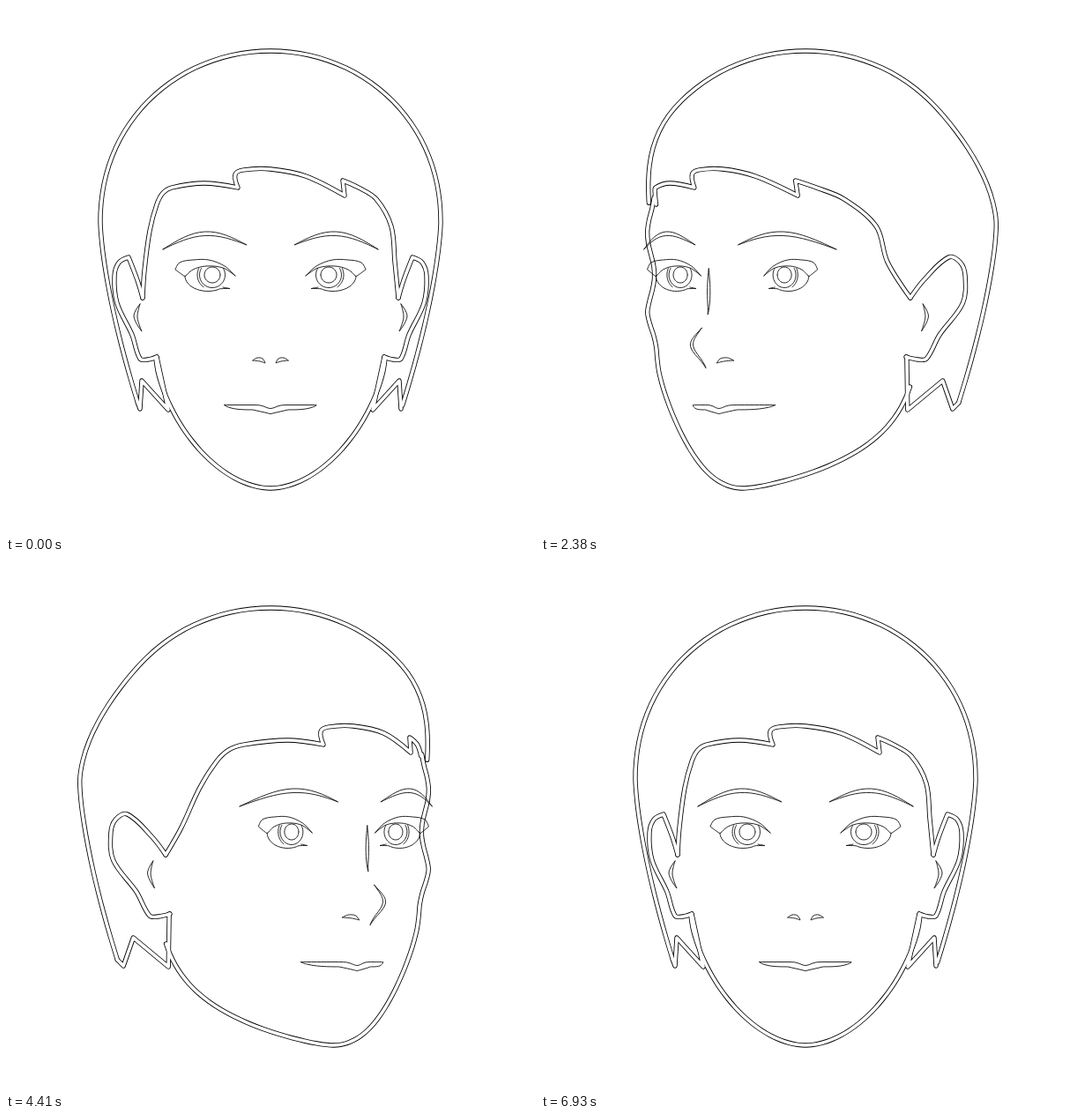
Recreate the animation shown at these times as an HTML page with a canvas. Size 600 px wide and 600 px high, loop 7 s.

```html
<!DOCTYPE html>
<html lang="en">
<head>
<meta charset="utf-8">
<title>Turning head</title>
<style>
  html, body { margin: 0; width: 100%; height: 100%; overflow: hidden; background: #fff; }
  canvas { display: block; width: 600px; height: 600px; }
</style>
</head>
<body>
<canvas id="stage" width="600" height="600"></canvas>
<script>
const ctx = document.getElementById('stage').getContext('2d');
const STEP = 70, COUNT = 100, SWING = 48, MAX_YAW = 37;
const { PI, sin, cos, sqrt, exp, abs, min, max, hypot } = Math;

// Head space: x from the middle, y down the stage, z towards the viewer
const parse = s => s.trim().split(/\s+/).map(p => p.split(',').map(Number));
const range = (n, f) => Array.from({ length: n + 1 }, (_, i) => f(i / n));
const mix = (a, b, t) => a + (b - a) * t;
const smooth = t => { t = min(1, max(0, t)); return t * t * (3 - 2 * t); };
const mirror = pts => pts.map(([x, ...rest]) => [-x, ...rest]);
const withDepth = (pts, depth) => pts.map(([x, y]) => [x, y, depth(x)]);

// Skull of hair: half width and depth of the centre at each height
const hairHalf = y => y < 245
  ? 193 * sqrt(max(0, 1 - ((245 - y) / 194) ** 2.1))
  : 193 - 44 * ((y - 245) / 210) ** 1.5;
const hairDepth = y => -46 * smooth((y - 110) / 150);

// Face outline: half width, depth on the near and the far side
const jawPart = y => min(1, max(0, (y - 400) / 147));
const jawHalf = y => 130 * (1 - jawPart(y) ** 1.5) ** 0.54;
const jawDepth = y => -20 + 180 * jawPart(y) ** 4;
function cheekDepth(y) {
  const rise = min(1, max(0, (400 - y) / 50));
  return 116 + 44 * jawPart(y) ** 3 + rise * (16 + 9 * cos(2 * PI * (y - 258) / 94));
}

const fringe = withDepth(parse(`-145,331 -143,300 -137,255 -129,225 -122,212 -112,206
  -75,201 -37,206 -40,191 -31,186 0,185 40,193 84,215 82,198 100,206 120,219 137,250 141,290 145,331`),
  x => 24 + 186 * sqrt(1 - abs(x / 145) ** 2.7));
const ear = parse(`-145,331,24 -151,311,2 -161,285,-41 -172,291,-49 -177,306,-51 -174,337,-51
  -157,373,-26 -148,400,-11 -139,401,-7 -129,398,3`);
const tail = parse('-148,457,-77 -146,425,-56 -116,458,-27 -129,398,1');
const concha = parse('-148,338,-2 -155,352,-2 -146,369,-2 -151,353,-2');

const browEdge = rise => range(8, t => [mix(-122, -27, t), mix(276, 271, t) - rise * sin(PI * t)]);
const brow = withDepth([...browEdge(17.5), ...browEdge(13).reverse().slice(1, -1)],
  x => 228 - 0.0042 * x * x);

const nostril = withDepth(parse('-20,402 -15,399 -9,400 -6,405 -12,403'), x => 243 - 1.05 * abs(x));

const lipTop = x => 452.5 + 4 * exp(-((x / 8) ** 2));
const lipBottom = x => 453 + 5 * (1 - (x / 52) ** 6) + 4.5 * max(0, 1 - abs(x) / 20);
const lipEdge = f => range(26, t => [mix(-52, 52, t), f(mix(-52, 52, t))]);
const mouth = withDepth([...lipEdge(lipTop), ...lipEdge(lipBottom).reverse()], x => 219 - 0.014 * x * x);

const onEye = pts => withDepth(pts, () => 185);
const arc = (x, y, rx, ry, from, to) =>
  range(16, t => [x + rx * cos(mix(from, to, t)), y + ry * sin(mix(from, to, t))]);
const lid = onEye(parse('-40,306 -52,295 -70,288 -88,288 -103,291 -108,299 -97,307 -88,299 -73,295 -54,297'));
const eyeLines = [
  [...arc(-71, 306, 26, 17.5, PI, 1), [-46, 320.5], [-54, 319]],
  arc(-66, 305, 9, 9, 0, 2 * PI),
  arc(-66, 305, 14.5, 14.5, -0.55, PI + 0.55),
  arc(-66, 305, 17, 17, 2.2, 3.6)
].map(onEye);

// A sliver of the nose profile that swells in the middle
function noseSliver(mid, reach) {
  const side = width => range(12, t => {
    const y = mid + reach * (2 * t - 1), g = exp(-(((y - 384) / 20) ** 2));
    return [14 + 14 * g + width * sin(PI * t), y, 217 + 15 * g];
  });
  return [...side(1.8), ...side(-1.8).reverse().slice(1, -1)];
}

// Smooth curve that keeps sharp turns as corners
function trace(pts, closed) {
  const n = pts.length;
  const at = i => pts[(i + n) % n];
  const unit = (p, q) => {
    const dx = q[0] - p[0], dy = q[1] - p[1], l = hypot(dx, dy) || 1;
    return [dx / l, dy / l];
  };
  const dir = pts.map((p, i) => {
    if (!closed && (i === 0 || i === n - 1)) return [0, 0];
    const a = unit(at(i - 1), p), b = unit(p, at(i + 1));
    return a[0] * b[0] + a[1] * b[1] < 0.3 ? [0, 0] : unit(at(i - 1), at(i + 1));
  });
  ctx.beginPath();
  ctx.moveTo(...pts[0]);
  for (let i = 0; i < (closed ? n : n - 1); i++) {
    const p = at(i), q = at(i + 1), d = dir[i], e = dir[(i + 1) % n];
    const h = hypot(q[0] - p[0], q[1] - p[1]) / 3;
    ctx.bezierCurveTo(p[0] + d[0] * h, p[1] + d[1] * h, q[0] - e[0] * h, q[1] - e[1] * h, q[0], q[1]);
  }
  if (closed) ctx.closePath();
}

function stroke(pts, color, width, closed) {
  if (pts.length < 2) return;
  trace(pts, closed);
  ctx.strokeStyle = color;
  ctx.lineWidth = width;
  ctx.stroke();
}

function yawAt(n) {
  const swing = i => {
    const s = sin(PI * i / SWING);
    return MAX_YAW * (0.55 * s + 0.45 * s * s);
  };
  if (n <= SWING) return -swing(n);
  return n <= 2 * SWING + 1 ? swing(n - SWING - 1) : 0;
}

// Everything is worked out as a turn to the right; dir flips it for the left
function draw(yaw) {
  const dir = yaw < 0 ? -1 : 1, turn = abs(yaw);
  const c = cos(turn * PI / 180), s = sin(turn * PI / 180);
  const across = ([x, , z]) => x * c + z * s;
  const place = (x, y) => [300 + dir * x, y];
  const project = pts => pts.map(p => place(across(p), p[1]));
  const faceEdge = y => jawHalf(y) * c + cheekDepth(y) * s;
  const inSight = (x, y) => x < 0 || y < 205 || x >= faceEdge(y) - 1;
  const visible = pts => pts.filter(p => p[2] > 120 || inSight(across(p), p[1]));
  const thin = (pts, closed = true) => stroke(project(pts), '#000', 0.85, closed);

  const hairEdge = (side, y) =>
    [side * hairHalf(y) * sqrt(c * c + 1.166 * s * s) + hairDepth(y) * s, y];
  const hair = [
    ...range(8, t => hairEdge(-1, mix(450, 245, t))),
    ...range(28, t => hairEdge(t < 0.5 ? -1 : 1, 245 - 194 * sin(PI * t))).slice(1),
    ...range(14, t => hairEdge(1, mix(245, 453, t))).slice(1)
  ].filter(p => inSight(...p));

  const jawTop = Math.asin(turn * 1.2 / 147);
  const cheekTop = 400 - 183 * min(1, turn / 22);
  const jaw = [
    ...range(16, t => {
      const y = 400 + 147 * sin(mix(jawTop, PI / 2, t));
      return [jawDepth(y) * s - jawHalf(y) * c, y];
    }),
    ...range(16, t => {
      const y = 400 + 147 * cos(t * PI / 2);
      return [faceEdge(y), y];
    }).slice(1),
    ...range(14, t => {
      const y = mix(400, cheekTop, t);
      return [faceEdge(y), y];
    }).slice(1)
  ];

  const bands = [hair, jaw].map(b => b.map(p => place(...p)));
  const locks = [ear, mirror(ear), tail, mirror(tail), dir < 0 ? mirror(fringe) : fringe];
  for (const lock of locks) bands.push(project(visible(lock)));
  bands[4].unshift(place(...hair[0]));

  ctx.fillStyle = '#fff';
  ctx.fillRect(0, 0, 600, 600);
  ctx.lineJoin = ctx.lineCap = 'round';
  for (const b of bands) stroke(b, '#000', 5.3);
  for (const b of bands) stroke(b, '#fff', 3.6);

  if (turn > 8) {
    thin(noseSliver(324, (turn - 8) * 1.4));
    thin(noseSliver(388, min(28, 12 + 0.65 * (turn - 10))));
  }
  thin(concha);
  if (inSight(across(mirror(concha)[0]), 338)) thin(mirror(concha));
  thin(nostril);
  if (turn < 20) thin(mirror(nostril));
  thin(mouth);
  for (const flip of [pts => pts, mirror]) {
    thin(flip(brow));
    thin(flip(lid));
    for (const line of eyeLines) thin(flip(line), false);
  }
}

const start = performance.now();
function tick() {
  const t = max(0, performance.now() - start);
  draw(yawAt(Math.floor(t / STEP) % COUNT));
  requestAnimationFrame(tick);
}
tick();
</script>
</body>
</html>
```
